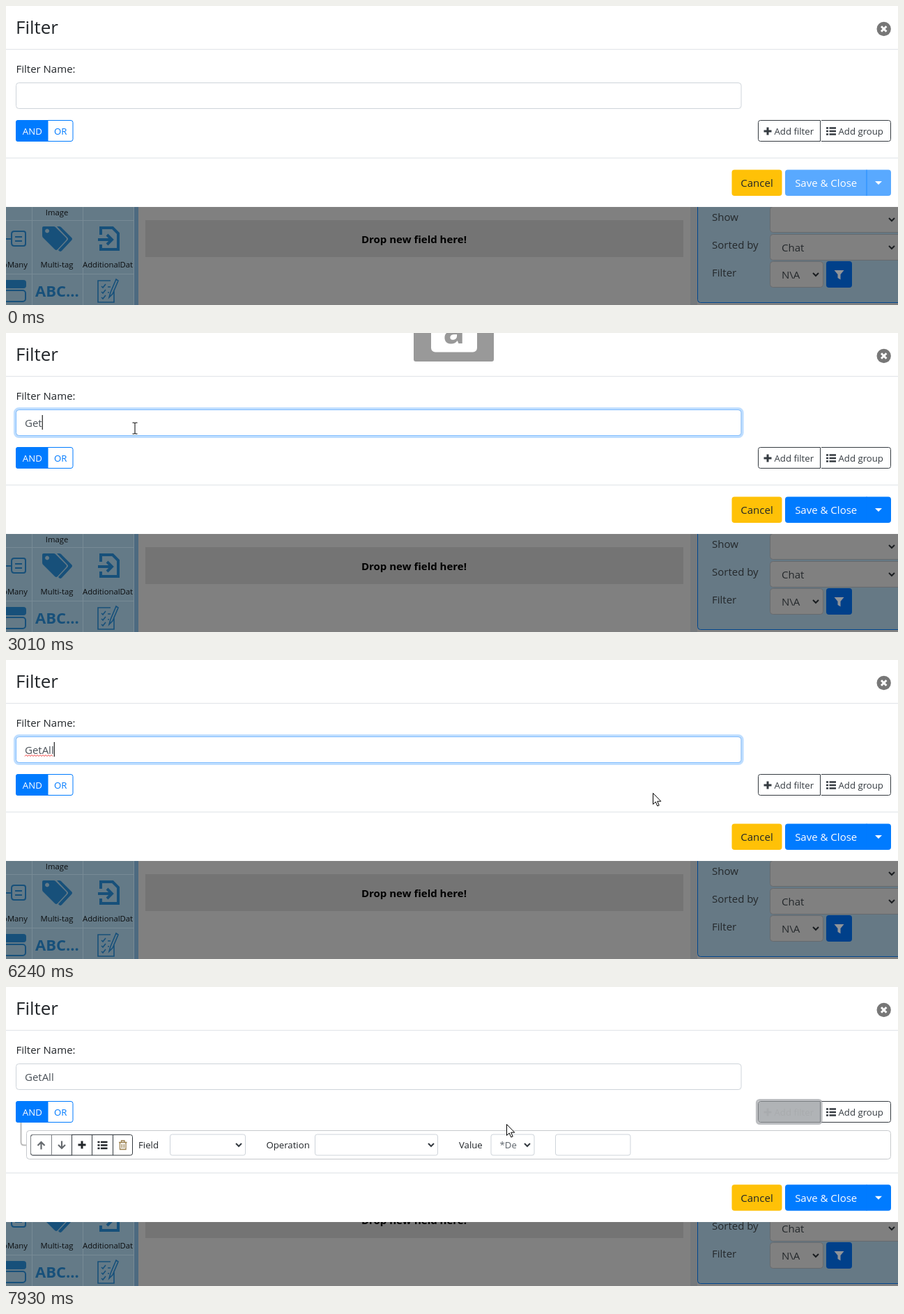
These frames come from a looping animation (1280 by 430 pixels, 8000 ms). An HTML page:

```html
<!DOCTYPE html>
<html lang="en">
<head>
<meta charset="utf-8">
<title>Filter dialog</title>
<style>
html, body { margin: 0; height: 100%; overflow: hidden; background: #808080; }
svg { display: block; width: 100%; height: 100%; }
text { font: 15px "Open Sans", "Noto Sans", sans-serif; fill: #212529; white-space: pre; }
.mid { text-anchor: middle; }
.sm { font-size: 13.2px; }
.tiny { font-size: 11.3px; fill: #0c0e10; }
.w { fill: #fff; }
.line { fill: none; stroke: #343a40; }
.box { fill: #fff; stroke: #ced4da; }
.dim { fill: #808080; stroke: #676a6d; }
.dark { fill: #24282b; }
.ink { fill: #17507a; }
.pen { fill: none; stroke: #17507a; stroke-width: 2; }
.blue { fill: #007bff; }
.off .blue { opacity: .65; }
</style>
</head>
<body>
<svg viewBox="0 0 1280 430">
  <defs>
    <path id="plus" d="M0-5.5V5.5M-5.5 0H5.5" stroke-width="3"/>
    <path id="list" d="M-7-4.5h3M-7 0h3M-7 4.5h3M-2.500-4.500H7M-2.500 0H7M-2.500 4.500H7" stroke-width="2.500"/>
    <path id="chev" d="M-4-2L0 2L4-2" fill="none" stroke-width="2"/>
    <path id="up" d="M0 5.500V-5M-5 0L0-5L5 0" fill="none" stroke-width="2.200"/>
  </defs>

  <!-- dimmed page -->
  <rect width="1280" height="430" fill="#808080"/>
  <rect width="184" height="430" fill="#647a87"/>
  <path d="M37.500 289V430M110.500 289V430M183.500 289V430M0 308.500H184M0 385.500H184" stroke="#778a95"/>
  <rect x="184" y="289" width="6" height="141" fill="#4d6a80"/>
  <text class="tiny mid" x="73" y="301">Image</text>
  <text class="tiny" x="31" y="376" text-anchor="end">ToMany</text>
  <text class="tiny mid" x="73" y="376">Multi-tag</text>
  <text class="tiny" x="110" y="376">AdditionalDat</text>
  <path class="pen" d="M0 335H8M12 324H25Q28 324 28 327V342Q28 345 25 345H12Q8 345 8 341V328Q8 324 12 324M13 332H23M13 338H23"/>
  <path class="ink" fill-rule="evenodd" d="M54 317H68Q70 317 71 318L86 333Q88 335 86 337L74 350Q72 352 70 350L53 333Q52 332 52 330V319Q52 317 54 317M59 320.500a3 3 0 1 0 .1 0z"/>
  <path class="ink" d="M73 317H76Q78 317 79 318L94 333Q96 335 94 337L80 352Q78 354 76 352L75 351L88 337Q90 335 88 333z"/>
  <path class="pen" stroke-width="4" style="stroke-width:4" d="M136 329V319H153L161 327V350H136V343M132 336H151M145 329L152 336L145 343"/>
  <rect class="ink" x="-8" y="394" width="37" height="12" rx="4"/>
  <rect class="pen" x="-8" y="409" width="36" height="16" rx="4"/>
  <text class="mid ink" x="73.500" y="418" style="font-size:22px;font-weight:700;fill:#17507a">ABC...</text>
  <path class="pen" d="M155 408V426H132V395H150M137 403L139 405L143 400M137 411L139 413L143 408M137 419L139 421L143 416M146 404H150M146 412H148M148 419L150 412L158 393L161 395L153 414z" style="stroke-width:1.600"/>
  <rect x="200" y="308" width="772" height="53" fill="#747474"/>
  <text class="mid" x="585.500" y="340.500" style="font-weight:700;fill:#000">Drop new field here!</text>
  <rect x="982" y="289" width="10" height="141" fill="#75797c"/>
  <rect x="992.500" y="200" width="300" height="226.500" rx="4" fill="#667985" stroke="#00468f"/>
  <g class="dark">
    <text x="1013" y="309" class="dark">Show</text>
    <text x="1013" y="349" class="dark">Sorted by</text>
    <text x="1013" y="389" class="dark">Filter</text>
    <rect class="dim" x="1096.500" y="288.500" width="200" height="37" rx="4"/>
    <rect class="dim" x="1096.500" y="328.500" width="200" height="37" rx="4"/>
    <rect class="dim" x="1096.500" y="367.500" width="76" height="37" rx="4"/>
    <text x="1113" y="353" class="dark">Chat</text>
    <text x="1113" y="392" class="dark">N\A</text>
  </g>
  <g stroke="#1a1d20">
    <use href="#chev" x="1271" y="307"/><use href="#chev" x="1271" y="347"/><use href="#chev" x="1162" y="386"/>
  </g>
  <rect x="1177" y="367" width="37" height="38" rx="4" fill="#00408a"/>
  <path d="M1188.500 380H1202.500L1197.500 386V393.500L1193.500 391V386z" fill="#909498"/>

  <!-- dialog -->
  <rect id="panel" width="1280" height="289" fill="#fff"/>
  <text x="14" y="39.500" style="font-size:26px;font-weight:500">Filter</text>
  <circle cx="1259.700" cy="33" r="10.200" fill="#777"/>
  <path d="M1256 29.300l7.400 7.400M1263.400 29.300l-7.400 7.400" stroke="#fff" stroke-width="3"/>
  <path d="M0 62.300H1280" stroke="#dee2e6"/>
  <text x="14.500" y="96">Filter Name:</text>
  <rect class="box" x="14.500" y="110.500" width="1040.500" height="37" rx="4"/>
  <g id="focus" fill="none">
    <rect x="12.500" y="108.500" width="1044.500" height="41" rx="6" stroke="#bfdeff" stroke-width="3.200"/>
    <rect x="14.500" y="110.500" width="1040.500" height="37" rx="4" stroke="#80bdff"/>
  </g>
  <path id="squiggle" fill="none" stroke="#e33"/>
  <text id="typed" x="27" y="135" style="fill:#495057"></text>
  <rect id="caret" y="118" width="1.200" height="21" fill="#222"/>

  <rect x="14.500" y="164.500" width="81.500" height="30" rx="3" fill="#fff" stroke="#007bff"/>
  <path class="blue" d="M60.500 164V195H17.500Q14 195 14 191.500V167.500Q14 164 17.500 164z"/>
  <text class="sm mid w" x="37.800" y="185" style="fill:#fff">AND</text>
  <text class="sm mid" x="78.300" y="185" style="fill:#007bff">OR</text>

  <rect class="line" x="1079.500" y="164.500" width="190" height="30" rx="3"/>
  <g stroke="#343a40"><use href="#list" x="1184" y="180"/></g>
  <text class="sm" x="1194.500" y="185" style="fill:#343a40">Add group</text>
  <rect x="1078" y="163" width="92" height="33" fill="#fff"/>
  <g id="add">
    <rect id="addRing" x="1077.500" y="162.500" width="92.500" height="34" rx="4" fill="none" stroke="#999ca0" stroke-width="3.200"/>
    <path id="addBox" stroke="#343a40" d="M1168.500 164.500V194.500H1082.500Q1079.500 194.500 1079.500 191.500V167.500Q1079.500 164.500 1082.500 164.500z"/>
    <g id="addPlus"><use href="#plus" x="1093" y="180"/></g>
    <text id="addText" class="sm" x="1102.500" y="185">Add filter</text>
  </g>

  <g id="row">
    <path d="M21.500 195V223Q21.500 227.500 26 227.500H29" fill="none" stroke="#bbb" stroke-width="2"/>
    <rect x="29.500" y="206.500" width="1240" height="41" rx="4" fill="#fff" stroke="#c6c9cc"/>
    <rect x="35.500" y="212.500" width="146" height="29.500" rx="3" class="line"/>
    <path d="M94.500 212.500H38Q35.500 212.500 35.500 215V239Q35.500 242 38 242H94.500M65.500 212V242" fill="none" stroke="#7b7f83"/>
    <path class="line" d="M94.500 212V242M123.500 212V242M153.500 212V242"/>
    <g stroke="#666a6e"><use href="#up" x="50.500" y="228"/><use href="#up" transform="translate(80 227) scale(1 -1)"/></g>
    <g stroke="#212529"><use href="#plus" x="109" y="227"/><use href="#list" x="138.500" y="227.500"/></g>
    <path d="M162 223.500H173.500M165.500 223V221H170V223M163.500 224V233.500H172V224M166.300 226V231.500M169.300 226V231.500" fill="none" stroke="#9a7f4c" stroke-width="1.300"/>
    <text class="sm" x="190" y="232">Field</text>
    <text class="sm" x="373.500" y="232">Operation</text>
    <text class="sm" x="650" y="232">Value</text>
    <rect class="box" x="235.500" y="212" width="108" height="30" rx="3"/>
    <rect class="box" x="443.500" y="212" width="176" height="30" rx="3"/>
    <rect class="box" x="696" y="212" width="62" height="30" rx="3"/>
    <rect class="box" x="788.500" y="212" width="107.500" height="30" rx="3"/>
    <text id="value" class="sm" x="708.500" y="232" style="fill:#5c636a">*De</text>
    <g stroke="#343a40"><use href="#chev" x="334" y="227"/><use href="#chev" x="610" y="227"/><use href="#chev" x="748" y="227"/></g>
  </g>

  <g id="footer">
    <path d="M0 218.700H1280" stroke="#dee2e6"/>
    <rect x="1041.500" y="235.500" width="72" height="37.500" rx="4" fill="#ffc107"/>
    <text class="mid" x="1077.500" y="260">Cancel</text>
    <g id="save">
      <path class="blue" d="M1235.500 235.500V273H1122Q1118 273 1118 269V239.500Q1118 235.500 1122 235.500z"/>
      <path class="blue" d="M1234.500 235.500H1266Q1270 235.500 1270 239.500V269Q1270 273 1266 273H1234.500z"/>
    </g>
    <text class="mid" x="1176.700" y="260" style="fill:#fff">Save &amp; Close</text>
    <path d="M1247 252H1257L1252 257z" fill="#fff"/>
  </g>

  <!-- caps lock notice -->
  <g id="caps">
    <rect x="585" y="-60" width="115" height="101" rx="3" fill="#999"/>
    <rect x="610" y="-40" width="66" height="67.500" rx="6" fill="#fff"/>
    <text id="capsKey" class="mid" x="643" y="15" style="font-size:52px;font-weight:700;fill:#999"></text>
  </g>

  <circle id="ring" r="11.500" fill="#c8bc00" fill-opacity=".62"/>
  <path id="cursor" stroke="#000" stroke-linejoin="round"/>
</svg>
<script>
const $ = id => document.getElementById(id);
const LOOP = 8000, FOCUS = 1420, BLUR = 6850, ADDED = 7060;
const WORD = 'GetAll', KEYS = [2480, 2810, 3010, 4070, 4670, 4870];
const SHAPES = {
  arrow: 'M.5.500V16.500L4.200 13L6.800 19L9.200 18L6.700 12.200H11.800z',
  beam: 'M-3.500-8H-1Q0-8 0-7Q0-8 1-8H3.500M0-7V7M-3.500 8H-1Q0 8 0 7Q0 8 1 8H3.500',
  hand: 'M-1 13V1.500a1.700 1.700 0 0 1 3.400 0V8.500c1.500-1 3-.7 3.200.5 1.500-.8 2.800-.3 3 .8 1.600-.5 2.400.3 2.400 1.600v4c0 2-1.500 3-1.500 6H.5c0-2-6.500-7-6-8.500s3-1 4.500 1.500z'
};
// time, x, y
const PATH = [
  [250, 1037, 391], [320, 975, 372], [530, 640, 262], [740, 360, 180], [880, 230, 147],
  [1020, 189, 142], [1160, 185, 137],
  [5260, 185, 137], [5330, 189, 135], [5470, 205, 136], [5680, 330, 150], [5890, 580, 175],
  [6100, 820, 191], [6240, 928, 191], [6450, 1070, 184], [6660, 1104, 180],
  [7720, 1104, 180], [7790, 1000, 184], [7860, 820, 192], [7930, 718, 197]
];

const clamp = v => Math.min(1, Math.max(0, v));
const ramp = (t, start, length) => clamp((t - start) / length);
const show = (id, on) => $(id).setAttribute('visibility', on ? 'visible' : 'hidden');
const set = (id, attrs) => { for (const k in attrs) $(id).setAttribute(k, attrs[k]); };

function pointer(t) {
  const base = t < 2000 ? 250 : t < 7790 ? 5330 : 7790;
  const q = base + Math.floor((t - base) / 70) * 70;
  const i = PATH.findIndex(p => p[0] > q);
  if (i < 0) return PATH[PATH.length - 1].slice(1);
  if (i === 0) return PATH[0].slice(1);
  const [a, b] = [PATH[i - 1], PATH[i]], k = (q - a[0]) / (b[0] - a[0]);
  return [a[1] + (b[1] - a[1]) * k, a[2] + (b[2] - a[2]) * k];
}

function drawCursor(t) {
  const [x, y] = pointer(t);
  const overInput = x < 1055 && y > 110 && y < 148;
  const overAdd = x > 1079 && y > 164 && y < 195 && t < ADDED;
  const shape = overInput ? 'beam' : overAdd ? 'hand' : 'arrow';
  set('cursor', {
    d: SHAPES[shape], transform: `translate(${x} ${y})`,
    fill: shape === 'beam' ? 'none' : '#fff'
  });
  set('ring', { cx: x, cy: y });
  show('cursor', t >= 250);
  show('ring', (t >= 1300 && t < 1500) || (t >= BLUR && t < ADDED));
}

function drawInput(t) {
  const count = KEYS.filter(k => k <= t).length;
  const last = count ? KEYS[count - 1] : FOCUS;
  $('typed').textContent = WORD.slice(0, count);
  const width = count ? $('typed').getComputedTextLength() : 0;
  set('caret', { x: 27 + width });
  show('caret', t >= FOCUS && t < BLUR && Math.floor((t - last) / 530) % 2 === 0);
  set('focus', { opacity: ramp(t, 1370, 140) * (1 - ramp(t, BLUR, 130)) });
  show('squiggle', t >= 5600 && t < BLUR);
  set('save', { class: count ? '' : 'off' });
}

function drawAddButton(t) {
  const hover = ramp(t, 6450, 150) * (1 - ramp(t, 7870, 150));
  const mix = c => Math.round(c + (255 - c) * hover * hover);
  const ink = `rgb(${mix(52)},${mix(58)},${mix(64)})`;
  set('addBox', { fill: `rgba(52,58,64,${hover})` });
  set('addPlus', { stroke: ink });
  $('addText').style.fill = ink;
  set('addRing', { opacity: ramp(t, BLUR, 130) });
  set('add', { opacity: t >= ADDED ? .65 : 1 });
}

function draw(t) {
  const added = t >= ADDED;
  show('caps', t >= 2150 && t < 5330);
  $('capsKey').textContent = t < 2550 || (t >= 3230 && t < 4200) ? 'A' : 'a';
  show('row', added);
  show('value', t >= 7390);
  set('panel', { height: added ? 338 : 289 });
  set('footer', { transform: `translate(0 ${added ? 48.7 : 0})` });
  drawInput(t);
  drawAddButton(t);
  drawCursor(t);
}

set('squiggle', { d: 'M27 138.500' + 'l2-2 2 2'.repeat(10) });
const start = performance.now();
function tick() {
  draw((performance.now() - start) % LOOP);
  requestAnimationFrame(tick);
}
tick();
</script>
</body>
</html>
```
